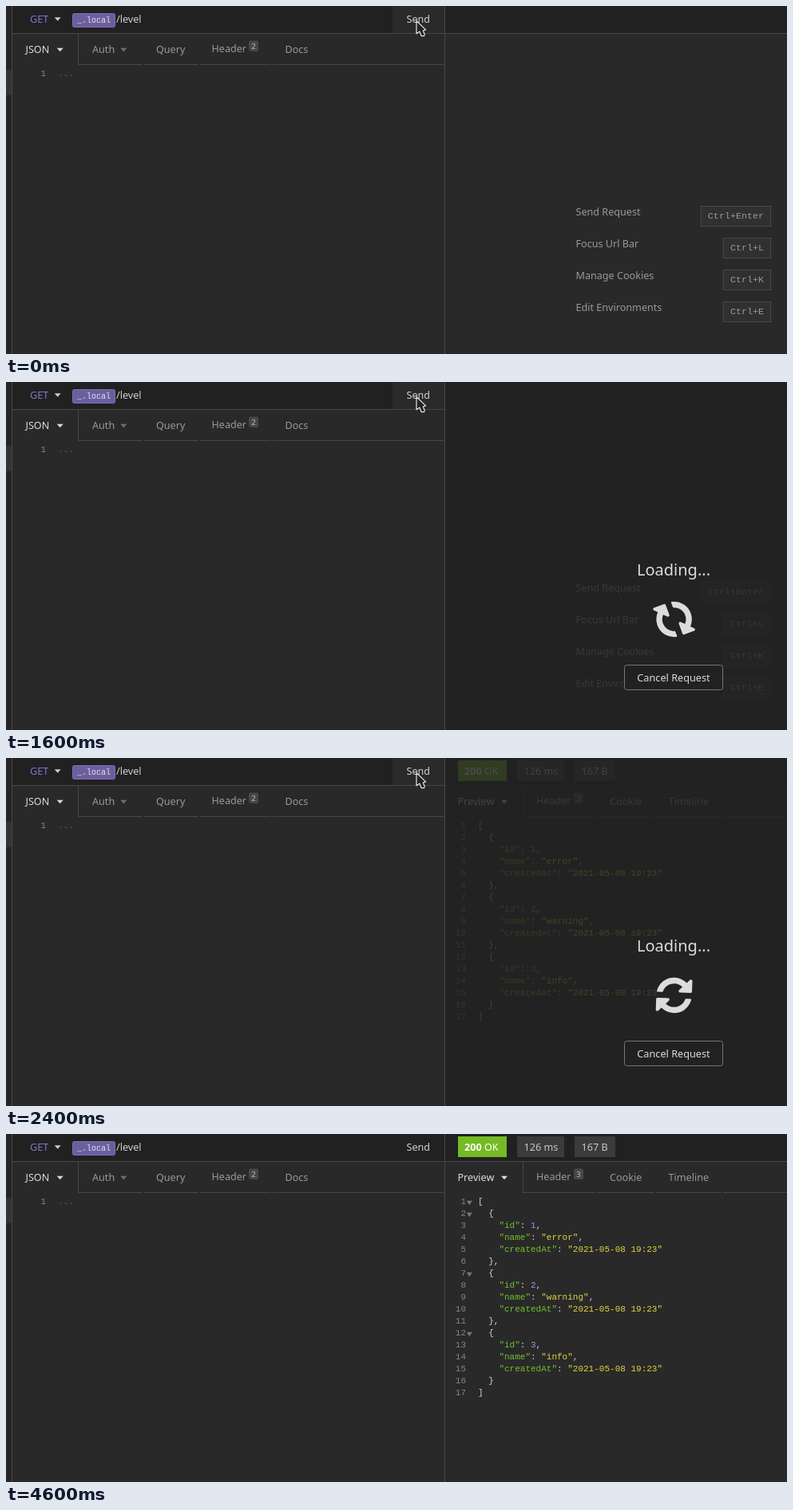
An HTML page for the animation above (4700 ms loop, 978 by 437 pixels).

```html
<!DOCTYPE html>
<html lang="en">
<head>
<meta charset="utf-8">
<title>Request and response</title>
<style>
html, body { margin: 0; width: 100%; height: 100%; overflow: hidden; background: #292929; }
svg { display: block; }
text { font-family: "Noto Sans", "Open Sans", sans-serif; white-space: pre; }
.mono { font-family: "Liberation Mono", monospace; }
</style>
</head>
<body>
<svg id="stage" width="978" height="437" viewBox="0 0 978 437"></svg>
<script>
const LINE = '#474747', BAR = '#212121', BODY = '#292929', LIGHT = '#dcdcdc', GREY = '#999';

const rect = (x, y, w, h, fill, more = '') =>
  `<rect x="${x}" y="${y}" width="${w}" height="${h}" fill="${fill}" ${more}/>`;
const label = (x, y, str, fill = GREY, size = 12.6, more = '') =>
  `<text x="${x}" y="${y}" fill="${fill}" font-size="${size}" ${more}>${str}</text>`;
const mono = (x, y, str, fill, size = 11, more = '') =>
  label(x, y, str, fill, size, `class="mono" ${more}`);
const caret = (x, y, fill = '#ccc', w = 8, h = 4.5) =>
  `<path d="M${x} ${y}h${w}l${-w / 2} ${h}z" fill="${fill}"/>`;
const badge = (x, n) =>
  rect(x, 43.5, 12, 13.5, '#474747', 'rx="2"') + label(x + 3.3, 53.8, n, '#bbb', 9.6);
const group = (id, body) => `<g id="${id}">${body}</g>`;

// Row under the tabs; the first tab is open at the bottom, the others are parted by small gaps.
const tabLine = (x, end, gaps) =>
  rect(x, 35, 1, 39, LINE) + rect(x, 73, end - x, 1, LINE) +
  gaps.map(g => rect(g, 73, 2, 1, BODY)).join('');

const leftPane = () =>
  rect(0, 0, 978, 437, BODY) +
  rect(0, 0, 7, 437, '#252525') + rect(0, 80, 7, 32, '#343434') +
  rect(8, 0, 970, 34, BAR) +
  group('hover', rect(484, 0, 65, 34, '#2a2a2a')) +
  rect(8, 34, 970, 1, LINE) + rect(7, 0, 1, 437, LINE) + rect(549, 0, 1, 437, LINE) +
  label(30, 21, 'GET', '#8574d2') + caret(60.7, 14.3) +
  rect(83.5, 9.5, 53, 17, '#6c5f9e', 'rx="2" stroke="#7e70b6"') +
  mono(89, 21, '_.local', '#e6e3f0', 10) +
  label(138, 21, '/level', '#d0d0d0') + label(501.5, 21, 'Send', '#d0d0d0') +
  tabLine(90, 549, [171, 241, 332]) +
  label(24.5, 59, 'JSON', LIGHT) + caret(63.7, 52.7, LIGHT) +
  label(108, 59, 'Auth') + caret(143.3, 52.7, '#707070') +
  label(188, 59, 'Query') + label(257.5, 58, 'Header') + badge(304, 2) +
  label(349.5, 59, 'Docs') +
  mono(50, 88, '1', '#858585', 11, 'text-anchor="end"') + mono(65, 88, '...', '#5c5c5c');

const hints = () => [
  ['Send Request', 'Enter'], ['Focus Url Bar', 'L'], ['Manage Cookies', 'K'], ['Edit Environments', 'E']
].map(([name, key], i) => {
  const y = 251 + 40 * i, w = (5 + key.length) * 7.02 + 17;
  return label(713.5, y + 12, name) +
    rect(957.5 - w, y + .5, w, 25, '#303030', 'stroke="#484848"') +
    mono(949, y + 16, 'Ctrl+' + key, '#999', 11.7, 'text-anchor="end"');
}).join('');

const paint = (str, fill) => `<tspan fill="${fill}">${str}</tspan>`;
const field = (key, value, fill, end) =>
  paint(`"${key}"`, '#72c02c') + ': ' + paint(value, fill) + end;

function codeLines() {
  const yellow = '#e0d541', rows = [[0, '[']];
  ['error', 'warning', 'info'].forEach((name, i) => rows.push(
    [2, '{'],
    [4, field('id', i + 1, '#a08df0', ',')],
    [4, field('name', `"${name}"`, yellow, ',')],
    [4, field('createdAt', '"2021-05-08 19:23"', yellow, '')],
    [2, i < 2 ? '},' : '}']));
  rows.push([0, ']']);
  return rows.map(([indent, str], i) =>
    mono(576, 88 + 15 * i, i + 1, '#858585', 11, 'text-anchor="end"') +
    mono(591 + indent * 6.6, 88 + 15 * i, str, '#d4d4d4')).join('');
}

const response = () =>
  rect(566, 3, 61, 26, '#75ba24') +
  label(574, 21, '<tspan font-weight="700">200</tspan> OK', '#fff') +
  rect(640, 3, 59, 26, '#3b3b3b') + label(648.5, 21, '126 ms', '#c8c8c8') +
  rect(712, 3, 51, 26, '#3b3b3b') + label(720.5, 21, '167 B', '#c8c8c8') +
  tabLine(647, 978, [738, 812, 896]) +
  label(565.5, 59, 'Preview', LIGHT) + caret(620, 52.7, LIGHT) +
  label(664, 58, 'Header') + badge(711, 3) +
  label(756, 59, 'Cookie') + label(829.5, 59, 'Timeline') +
  codeLines() +
  group('folds', [0, 1, 6, 11].map(i => caret(576.8, 83.7 + 15 * i, '#777', 7, 5.5)).join(''));

// One arrow of the spinner, in units around its centre; the other is the same turned by 180 degrees.
const ARROW = 'M768-640v448q0 26-19 45t-45 19h-448q-26 0-45-19t-19-45 19-45l138-138' +
  'q-148-137-349-137-134 0-250 65t-186 179q-11 17-53 117-8 23-30 23h-199' +
  'q-13 0-22.5-9.5t-9.5-22.5v-7q65-268 270-434.5t480-166.5q146 0 284 55.5t245 156.5' +
  'l130-129q19-19 45-19t45 19 19 45z';

const loading = () =>
  rect(550, 0, 428, 437, BAR, 'opacity=".82"') +
  label(836, 243, 'Loading...', LIGHT, 20, 'text-anchor="middle"') +
  group('spinner', `<path d="${ARROW}"/><path d="${ARROW}" transform="rotate(180)"/>`) +
  rect(774.5, 355.5, 123, 31, BAR, 'rx="3" stroke="#777"') +
  label(836, 376, 'Cancel Request', LIGHT, 12.7, 'text-anchor="middle"');

const pointer = '<path d="M0 0V16L4 13.3L6.2 19H9.6L10.2 16.8L8.2 12.3L11.6 11.2Z" ' +
  'fill="#222" stroke="#e4e4e4" stroke-width="1.2" stroke-linejoin="round"/>';

const $ = id => document.getElementById(id);
const show = (id, on) => $(id).style.display = on ? '' : 'none';

$('stage').innerHTML = leftPane() + group('hints', hints()) + group('response', response()) +
  group('loading', loading()) + group('pointer', pointer);
$('spinner').setAttribute('fill', LIGHT);

function draw(now) {
  const t = Math.floor(now % 4700 / 100) * 100;
  show('hints', t < 2400);
  show('response', t >= 2400);
  show('loading', t >= 200 && t < 2500);
  show('folds', t >= 2600);
  show('hover', t < 4300);
  show('pointer', t < 4300);
  const angle = 14 + 14 * Math.max(0, (t - 1200) / 100);
  $('spinner').setAttribute('transform', `translate(836.6 298) rotate(${angle}) scale(.029)`);
  const k = Math.min(1, Math.max(0, (t - 3100) / 300));
  $('pointer').setAttribute('transform', `translate(${514 - 18 * k} ${18.7 + 2.5 * k})`);
}

const start = performance.now();
function tick() {
  draw(performance.now() - start);
  requestAnimationFrame(tick);
}
tick();
</script>
</body>
</html>
```
